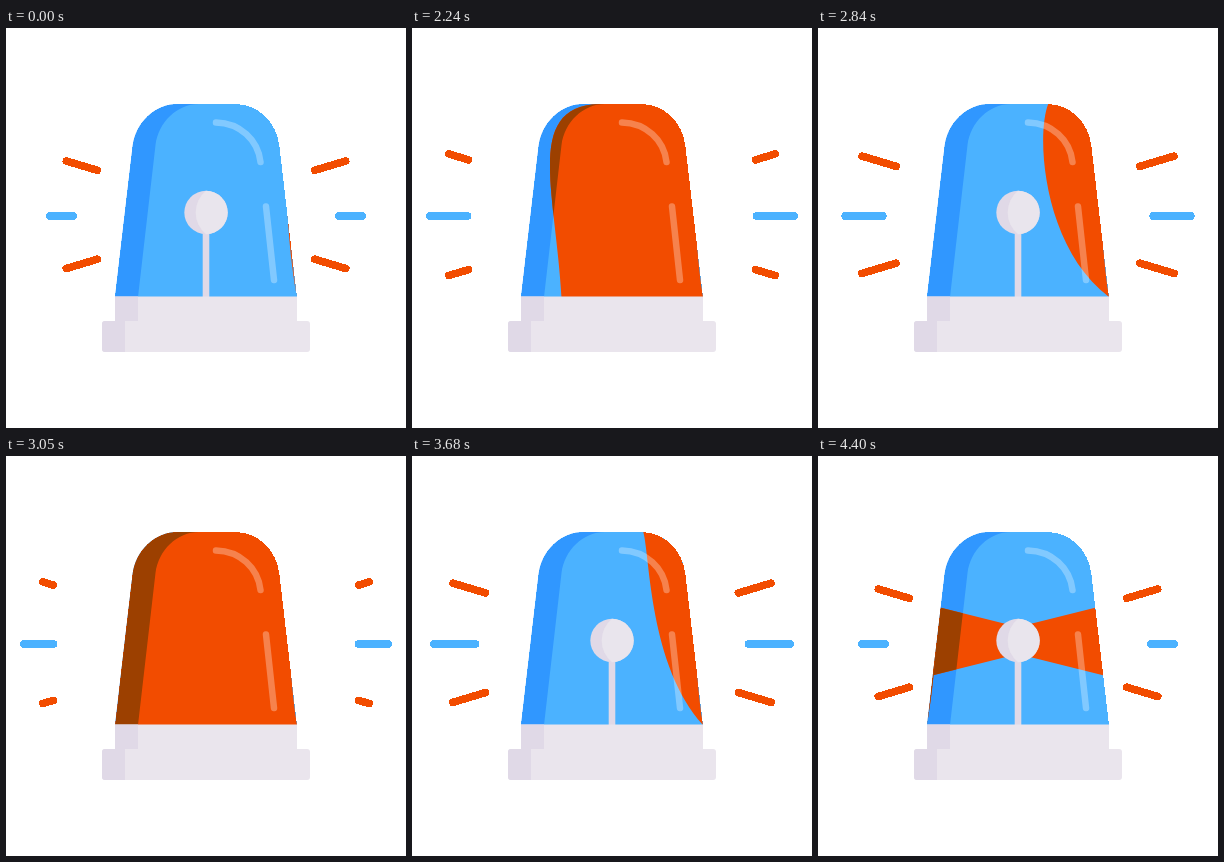
An HTML page that plays this animation: 400 by 400 pixels, repeating every 4430 ms.

```html
<!DOCTYPE html>
<html lang="en">
<head>
<meta charset="utf-8">
<title>Siren</title>
<style>
  html, body { margin: 0; width: 100%; height: 100%; overflow: hidden; background: #fff; }
  svg { display: block; width: 100vw; height: 100vh; }
  #rays { fill: none; stroke-linecap: round; stroke-width: 7.6; }
  #rays, #dome { shape-rendering: crispEdges; }
</style>
</head>
<body>
<svg viewBox="0 0 400 400">
  <defs>
    <path id="dome" d="M109 269L126.5 119C129.5 94 149 76 172 76H229C252 76 271 94 273.5 119L291 269Z"/>
    <path id="shade" d="M109 269L126.5 119C129.5 94 149 76 172 76H193C171 76 152.5 94 149.500 117L132 269Z"/>
    <g id="glow">
      <use href="#dome" fill="#f24c00"/>
      <use href="#shade" fill="#9c4000"/>
    </g>
    <clipPath id="beamClip"><path id="beam"/></clipPath>
    <clipPath id="sweepClip"><path id="sweep"/></clipPath>
  </defs>
  <g id="rays">
    <path id="blueRays" stroke="#4bb2ff"/>
    <path id="redRays" stroke="#f24c00"/>
  </g>
  <use href="#dome" fill="#4bb2ff"/>
  <use href="#shade" fill="#3097ff"/>
  <g clip-path="url(#beamClip)"><use href="#glow"/></g>
  <path d="M196.7 200H203.3V269H196.7Z" fill="#e0d9e7"/>
  <circle cx="200" cy="184.5" r="21.7" fill="#e0d9e7"/>
  <path d="M200 162.8A21.7 21.7 0 0 1 200 206.2A28 28 0 0 1 200 162.8Z" fill="#e9e5ed"/>
  <g clip-path="url(#sweepClip)"><use href="#glow"/></g>
  <g fill="none" stroke="#fff" stroke-opacity=".3" stroke-width="6.5" stroke-linecap="round">
    <path d="M210 94.5C234 95 252 112 254.5 134"/>
    <path d="M260 178.5L268 252"/>
  </g>
  <path d="M109 268.4H291V294H109Z" fill="#eae5ed"/>
  <rect x="96" y="293" width="208" height="31" rx="3" fill="#eae5ed"/>
  <path d="M109 268.4H132V293H119V324H99Q96 324 96 321V296Q96 293 99 293H109Z" fill="#e0d9e7"/>
</svg>
<script>
const LOOP = 4430, HOLD = 2000, STEP = 30;
const TURNS = [0, 25.25, 54];          // steps at which the lamp starts a turn
const PULSES = [-4.7, 20, 47, 75.3];   // steps at which rays are sent out
const SWEEP = 9, TURN = 20.5, PULSE = 20.2;

const byId = id => document.getElementById(id);
const setPath = (id, d) => byId(id).setAttribute("d", d);
const clamp = v => Math.min(1, Math.max(0, v));
const mix = (a, b, u) => a + (b - a) * u;
const smooth = u => u * u * (3 - 2 * u);
const easeOut = u => 1 - (1 - u) ** 2;
const since = (starts, k) => k - starts.filter(s => s <= k).pop();

// Bezier points of the light's edge, crossing from right (0) to left (1)
function edge(u) {
  const bulge = Math.sin(Math.PI * u ** 0.8);
  return [
    [mix(232, 168, u ** 3), 76],
    [mix(300, 100, u * (1.5 - u / 2)), 66 + 45 * bulge],
    [mix(268, 128, u), 140 + 85 * bulge],
    [mix(291, 109, clamp(2 * u - 1)), 269]
  ];
}

// The trailing edge is the leading one mirrored in space and time
function drawSweep(p) {
  const [a, b, c, d] = edge(clamp(p / SWEEP));
  const [e, f, g, h] = edge(clamp((TURN - p) / SWEEP)).map(([x, y]) => [400 - x, y]);
  setPath("sweep", `M${a[0]} 60L${a}C${b} ${c} ${d}L${h}C${g} ${f} ${e}V60Z`);
}

function drawBeam(p) {
  const e = clamp((p - 14) / 8);
  const top = 79 * e, low = 86 * e;
  const half = d => 13.5 + 0.25 * d;
  const side = s => `M200 171L${200 + s * top} ${184.5 - half(top)}` +
    `L${200 + s * low} ${184.5 + half(low)}L200 198Z`;
  setPath("beam", e > 0 ? side(-1) + side(1) : "");
}

// A segment and its mirror image
function pair(x1, x2, y) {
  return `M${x1} ${y(x1)}L${x2} ${y(x2)}M${400 - x1} ${y(x1)}L${400 - x2} ${y(x2)}`;
}

function drawRays(w) {
  const u = w / PULSE;
  byId("rays").style.display = u < 1 ? "" : "none";
  if (u >= 1) return;
  const redTail = mix(300, 363, smooth(u));
  const redHead = mix(300, 363.1, easeOut(clamp(w / 12)));
  const slope = x => (363 - x) * 0.3;
  setPath("redRays",
    pair(redTail, redHead, x => 126 + slope(x)) +
    pair(redTail, redHead, x => 247.5 - slope(x)));
  setPath("blueRays", pair(mix(332, 382, u ** 3), mix(332, 382.1, clamp(w / 9.8)), () => 188));
}

function draw(ms) {
  const k = Math.max(0, Math.floor((ms % LOOP - HOLD) / STEP));
  const p = since(TURNS, k);
  drawRays(since(PULSES, k));
  drawSweep(p);
  drawBeam(p);
}

const begin = performance.now();
function tick() {
  draw(performance.now() - begin);
  requestAnimationFrame(tick);
}
tick();
</script>
</body>
</html>
```
